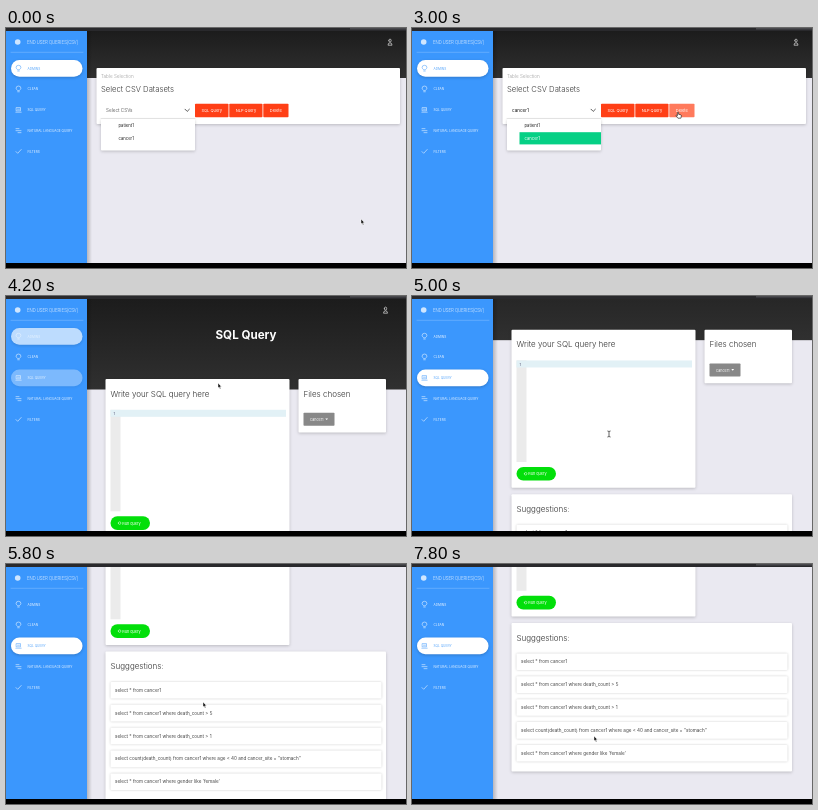
Animation of 400x240 px, one loop 8 s. Source, as an HTML page:

```html
<!DOCTYPE html>
<html lang="en">
<head>
<meta charset="utf-8">
<title>CSV query console</title>
<style>
  html, body { margin: 0; width: 100%; height: 100%; overflow: hidden; background: #000; }
  svg { display: block; width: 100vw; height: 100vh; }
  text { font-family: Inter, "Open Sans", sans-serif; dominant-baseline: central; white-space: pre; }
  .card { fill: #fff; filter: drop-shadow(0 1px 1.5px #0003); }
  .row { fill: #fff; filter: drop-shadow(0 .4px 1px #0003); }
  .line { fill: none; stroke-linecap: round; stroke-linejoin: round; }
</style>
</head>
<body>
<svg id="stage" viewBox="0 0 400 240">
  <defs>
    <linearGradient id="dark" x2="0" y2="1">
      <stop stop-color="#1c1c1c"/><stop offset="1" stop-color="#303030"/>
    </linearGradient>
    <linearGradient id="edge">
      <stop stop-color="#000" stop-opacity=".22"/><stop offset="1" stop-color="#000" stop-opacity="0"/>
    </linearGradient>
  </defs>
  <rect width="400" height="240" fill="#eae9f1"/>
  <g id="tables"></g>
  <g id="query"></g>
  <rect x="81" y="3" width="5" height="232" fill="url(#edge)"/>
  <g id="sidebar"></g>
  <rect width="400" height="3" fill="#29292c"/>
  <rect x="344" width="56" height="1.5" fill="#4a4a4e"/>
  <rect y="235" width="400" height="5" fill="#000"/>
  <g id="cursor"></g>
</svg>
<script>
const LOOP = 8000, STEP = 200;
const $ = id => document.getElementById(id);

function add(parent, tag, attrs, content) {
  const node = document.createElementNS("http://www.w3.org/2000/svg", tag);
  for (const name in attrs) node.setAttribute(name, attrs[name]);
  if (content !== undefined) node.textContent = content;
  return parent.appendChild(node);
}
const box = (parent, x, y, width, height, attrs) => add(parent, "rect", { x, y, width, height, ...attrs });
const label = (parent, x, y, size, fill, content, attrs) =>
  add(parent, "text", { x, y, "font-size": size, fill, ...attrs }, content);
const line = (parent, d, stroke, width = 0.7) =>
  add(parent, "path", { d, stroke, "stroke-width": width, class: "line" });
const show = (node, visible) => node.setAttribute("display", visible ? "inline" : "none");
const middle = { "text-anchor": "middle" };

function userIcon(parent, x) {
  line(parent, `M${x - 1.2} 12.6a1.2 1.5 0 1 1 2.4 0a1.2 1.5 0 1 1 -2.4 0M${x - 2} 16.8q0 -2 2 -2t2 2z`, "#ddd");
}

// Table selection page
const tables = $("tables");
box(tables, 81, 3, 319, 47, { fill: "url(#dark)" });
userIcon(tables, 384);
box(tables, 90.5, 40, 303.5, 56, { class: "card", rx: 1 });
label(tables, 95, 48, 4.6, "#999", "Table Selection", { "font-weight": 300 });
label(tables, 95, 61.3, 7.7, "#3c3c3c", "Select CSV Datasets", { "font-weight": 300 });
const chosen = label(tables, 100, 82.3, 4.6, "#666", "");
line(tables, "M179 81.2l2.2 2.2l2.2 -2.2", "#333", 0.8);
box(tables, 95, 91, 94, 31.5, { class: "card", rx: 1 });
line(tables, "M95 90.5H189", "#ccc", 0.5);

const options = ["patient1", "cancer1"].map((name, i) => {
  const y = 91.5 + 12.7 * i;
  return {
    y,
    fill: box(tables, 107.5, y, 81.5, 12.2, { fill: "#06d085" }),
    text: label(tables, 112.5, y + 6.2, 4.2, "#222", name)
  };
});

const buttons = [["SQL Query", 189, 33.5], ["NLP Query", 223.3, 33.2], ["Delete", 257.3, 25.2]].map(([name, x, w]) => {
  const fill = box(tables, x, 75.8, w, 13.4, { rx: 0.8, fill: "#ff3f16" });
  label(tables, x + w / 2, 82.6, 4, "#fff", name, middle);
  return { x, w, fill };
});

// SQL query page, scrolled as a whole
const query = $("query");
box(query, 81, 3, 319, 90.5, { fill: "url(#dark)" });
userIcon(query, 379.5);
label(query, 240, 38.5, 11.6, "#fff", "SQL Query", { ...middle, "font-weight": 700 });
box(query, 99.5, 83, 184, 158, { class: "card", rx: 1 });
label(query, 104.5, 97.7, 8, "#333", "Write your SQL query here", { "font-weight": 300 });
box(query, 104.5, 113.8, 10, 101.5, { fill: "#ebebeb" });
box(query, 104.5, 113.8, 175.5, 7, { fill: "#e2f1f6" });
label(query, 107.5, 117.4, 3.8, "#557", "1");
box(query, 104.5, 220.3, 39.5, 13.6, { rx: 6.8, fill: "#02df0a" });
line(query, "M112.3 227.1a1.3 1.3 0 1 1 2.6 0a1.3 1.3 0 1 1 -2.6 0", "#fff", 0.5);
label(query, 116.2, 227.2, 3.8, "#fff", "Run query");
box(query, 292.5, 83, 87.5, 53.5, { class: "card", rx: 1 });
label(query, 297.5, 97.7, 8, "#333", "Files chosen", { "font-weight": 300 });
box(query, 297.5, 116.8, 31, 13, { rx: 0.8, fill: "#888" });
label(query, 304, 123.4, 3.7, "#fff", "cancer1");
add(query, "path", { d: "M319.3 122.4h2.8l-1.4 1.6z", fill: "#fff" });
box(query, 99.5, 247.5, 280.5, 148.5, { class: "card", rx: 1 });
label(query, 104.5, 262, 8, "#333", "Sugggestions:", { "font-weight": 300 });
[
  "select * from cancer1",
  "select * from cancer1 where death_count > 5",
  "select * from cancer1 where death_count > 1",
  "select count(death_count) from cancer1 where age < 40 and cancer_site = \"stomach\"",
  "select * from cancer1 where gender like 'female'"
].forEach((sql, i) => {
  const y = 286.3 + 22.85 * i;
  box(query, 104.5, y - 8.3, 271, 16.6, { class: "row", rx: 1 });
  label(query, 109, y, 4.6, "#444", sql);
});

// Sidebar
const sidebar = $("sidebar");
box(sidebar, 0, 3, 81, 232, { fill: "#3b97fd" });
add(sidebar, "circle", { cx: 11.7, cy: 14, r: 2.8, fill: "#cfe6ff" });
label(sidebar, 21, 14.2, 4.5, "#f2f8ff", "END USER QUERIES(CSV)", { style: "font-family:Roboto,sans-serif", "font-weight": 300 });
line(sidebar, "M5 24.3H77", "#86bffe", 0.5);

const bulb = "M-1 1.2q-1.4 -1 -1.4 -2.1a2.4 2.2 0 0 1 4.8 0q0 1.1 -1.4 2.1zM-.8 2.6h1.6";
const menu = [
  ["ADMINS", bulb],
  ["CLEAN", bulb],
  ["SQL QUERY", "M-2 -2.3h4v3.2h-4zM-2.7 2.3h5.4M-1 -.7h2"],
  ["NATURAL LANGUAGE QUERY", "M-2.5 -2h3M-2.5 0h5M-.5 2h3"],
  ["FILTERS", "M-2.5 .2l1.7 1.7l3.5 -3.8"]
].map(([name, icon], i) => {
  const y = 40.4 + 20.75 * i;
  const pill = box(sidebar, 5, y - 8.4, 71.5, 16.8, { rx: 8.4, fill: "#fff", filter: "drop-shadow(0 1px 1.5px #0003)" });
  const mark = line(sidebar, icon, "#fff", 0.6);
  mark.setAttribute("transform", `translate(12.5 ${y})`);
  return { pill, mark, text: label(sidebar, 21.5, y + 0.2, 3.2, "#fff", name) };
});

// Cursor shapes share a hotspot at 0,0
const cursor = $("cursor");
const outline = { stroke: "#fff", "stroke-width": 0.5, "stroke-linejoin": "round" };
const shapes = {
  arrow: add(cursor, "path", { d: "M0 0V5L1.1 4L2 6L2.9 5.6L2 3.7H3.5Z", fill: "#111", ...outline }),
  hand: add(cursor, "path", {
    d: "M-.6 .5q.6 -.9 1.2 0v1.8l2.2 .6q.7 .3 .6 1l-.5 2.3h-3l-2 -2.6q.2 -.8 1.5 .2z",
    fill: "#fff", stroke: "#111", "stroke-width": 0.6
  }),
  beam: line(cursor, "M-1.2 -3q1 0 1.2 .7q.2 -.7 1.2 -.7M0 -2.3V2.3M-1.2 3q1 0 1.2 -.7q.2 .7 1.2 .7", "#222", 0.7)
};

// Each key is [time, ...values]
const cursorKeys = [
  [0, 355, 191], [200, 343, 184], [600, 260, 144], [1000, 163, 97], [1200, 156, 109], [1600, 156, 109],
  [2000, 206, 92], [2400, 262, 83], [2600, 244, 83], [2800, 250, 84], [3000, 266, 84], [3400, 266, 84],
  [3800, 212, 84], [4200, 212, 87], [4600, 212, 87], [5000, 197, 138], [7400, 197, 138], [7800, 182, 172]
];
const scrollKeys = [
  [4600, 0], [4800, 12], [5400, 124], [5800, 160], [6000, 166], [6400, 166],
  [6800, 178], [7200, 187], [7400, 188.5]
];

function sample(keys, t) {
  const next = keys.findIndex(key => key[0] > t);
  if (next === 0) return keys[0].slice(1);
  if (next < 0) return keys[keys.length - 1].slice(1);
  const a = keys[next - 1], b = keys[next], k = (t - a[0]) / (b[0] - a[0]);
  return a.slice(1).map((v, i) => v + (b[i + 1] - v) * k);
}

function render(t) {
  const [x, y] = sample(cursorKeys, t);
  const [scroll] = sample(scrollKeys, t);
  const onQuery = t >= 4000;
  show(tables, !onQuery);
  show(query, onQuery);
  query.setAttribute("transform", `translate(0 ${-scroll})`);

  const selected = t >= 1400;
  chosen.textContent = selected ? "cancer1" : "Select CSVs";
  chosen.setAttribute("fill", selected ? "#111" : "#666");
  let overLink = false;
  options.forEach((option, i) => {
    const hover = x > 107 && x < 189 && y >= option.y && y < option.y + 12.7;
    const lit = hover || (selected && i === 1);
    overLink ||= hover;
    show(option.fill, lit);
    option.text.setAttribute("fill", lit ? "#fff" : "#222");
  });
  buttons.forEach(({ x: left, w, fill }) => {
    const hover = x > left && x < left + w && y > 75 && y < 90;
    overLink ||= hover;
    fill.setAttribute("fill", hover ? "#ff7a5c" : "#ff3f16");
  });

  const fade = Math.min(1, Math.max(0, (t - 4000) / 600));
  const active = [1 - fade, 0, fade, 0, 0];
  menu.forEach(({ pill, mark, text }, i) => {
    const color = active[i] > 0.7 ? "#5aa7fb" : "#e4f1ff";
    pill.setAttribute("opacity", active[i]);
    mark.setAttribute("stroke", color);
    text.setAttribute("fill", color);
  });

  const kind = !onQuery && overLink ? "hand" : t >= 5000 && t < 5800 ? "beam" : "arrow";
  for (const name in shapes) show(shapes[name], name === kind);
  cursor.setAttribute("transform", `translate(${x} ${y})`);
}

const start = performance.now();
function tick() {
  const t = (performance.now() - start) % LOOP;
  render(Math.floor(t / STEP) * STEP);
  requestAnimationFrame(tick);
}
tick();
</script>
</body>
</html>
```
